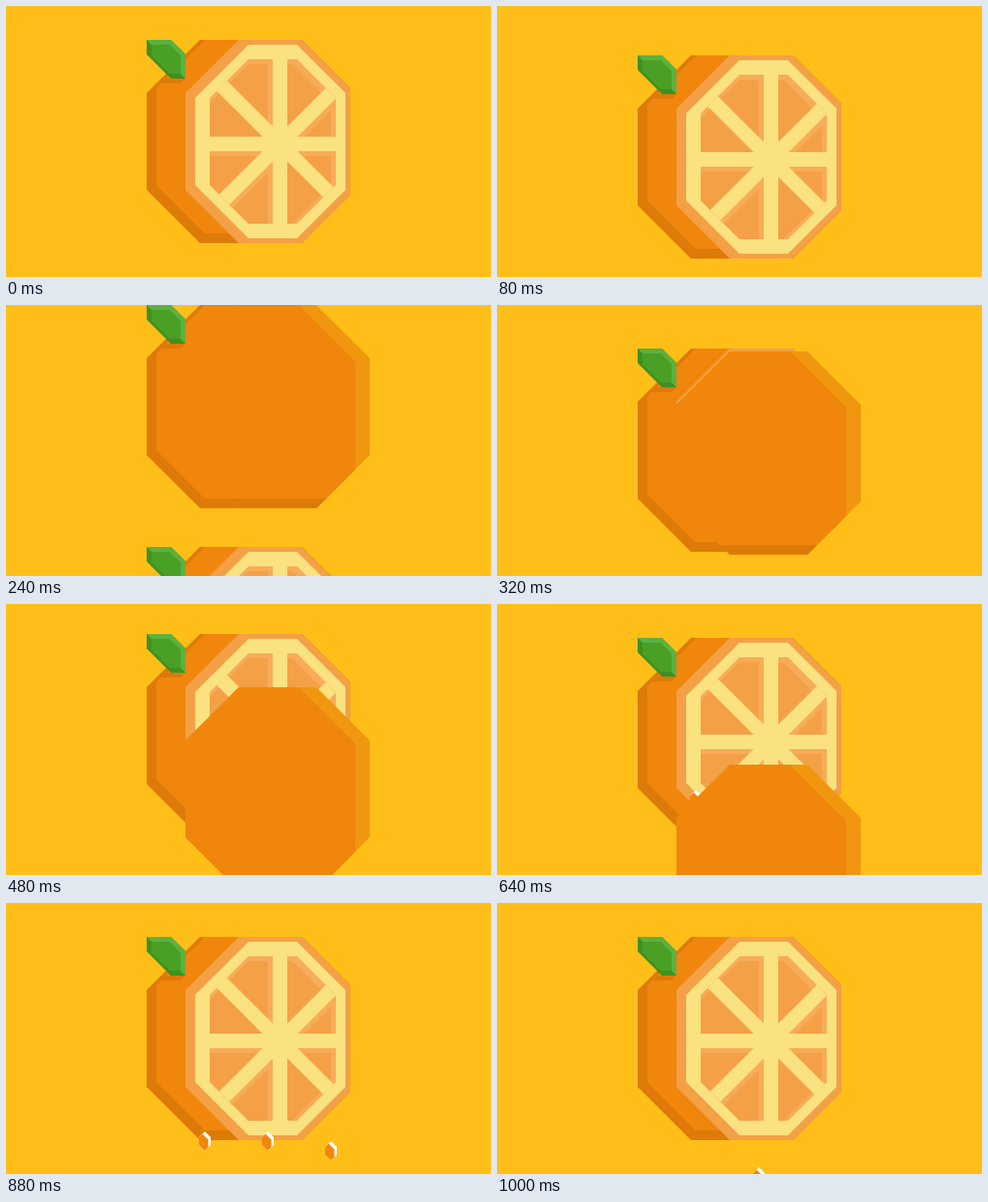
Animation of 500 by 280 pixels, one loop 1040 ms. Source, as an HTML page with a canvas:

```html
<!DOCTYPE html>
<html lang="en">
<head>
<meta charset="utf-8">
<title>Sliced orange</title>
<style>
  html, body { margin: 0; width: 100%; height: 100%; overflow: hidden; background: #ffbe18; }
  canvas { display: block; width: 500px; height: 280px; }
</style>
</head>
<body>
<canvas id="stage" width="500" height="280"></canvas>
<script>
const ctx = document.getElementById('stage').getContext('2d');
const LOOP = 1040, STEP = 40, REST = 35;
const C = {
  bg: '#ffbe18', skin: '#f0860c', dark: '#de7a08', light: '#f0970f',
  flesh: '#f4a046', lit: '#f8ac58', pith: '#f9e27f',
  leaf: '#4a9f25', leafDark: '#3f9020', leafLight: '#5cb140'
};

function poly(color, points) {
  ctx.beginPath();
  for (const [x, y] of points) ctx.lineTo(x, y);
  ctx.closePath();
  ctx.fillStyle = color;
  ctx.fill();
}

// Box with cut corners: `left` and `right` are the cut sizes on each side
function oct(color, x, y, w, h, left, right = left) {
  const r = x + w, b = y + h;
  poly(color, [
    [x + left, y], [r - right, y], [r, y + right], [r, b - right],
    [r - right, b], [x + left, b], [x, b - left], [x, y + left]
  ]);
}

// Fills a shape, then keeps further drawing inside it
function inside(shape, draw) {
  ctx.save();
  shape();
  ctx.clip();
  draw();
  ctx.restore();
}

function at(x, y, draw) {
  ctx.save();
  ctx.translate(Math.round(x), Math.round(y));
  draw();
  ctx.restore();
}

// Bar through the middle of the slice, in eighths of a turn
function spoke(color, eighth, shift = 0) {
  ctx.save();
  ctx.translate(282.5, 107.5);
  ctx.rotate(eighth * Math.PI / 4);
  ctx.fillStyle = color;
  ctx.fillRect(-120, shift - 7.5, 240, 15);
  ctx.restore();
}

function flesh() {
  oct(C.flesh, 210, 25, 125, 165, 40);
  for (const k of [-1, 0, 2]) spoke(C.lit, k, 5);
  for (let k = 0; k < 4; k++) spoke(C.pith, k);
}

function leaf(color, inset) {
  const s = 40 - 2 * inset, a = s * 0.375, lo = inset, hi = inset + s;
  poly(color, [[lo, lo], [hi - a, lo], [hi, lo + a], [hi, hi], [hi - a, hi], [lo, lo + a]]);
}

// Parts below are drawn relative to the top of the fruit
function half() {
  oct(C.dark, 145, 0, 210, 210, 55, 50);
  oct(C.skin, 155, 0, 200, 200, 50);
  poly(C.dark, [[165, 40], [185, 40], [180, 45], [160, 45]]);
  oct(C.flesh, 185, 0, 170, 210, 55, 50);
  oct(C.pith, 195, 5, 155, 200, 55, 50);
  inside(() => oct(C.lit, 210, 20, 130, 170, 40), flesh);
  at(145, 0, () => {
    inside(() => leaf(C.leafDark, 0), () => poly(C.leafLight, [[0, 0], [40, 0], [40, 40]]));
    leaf(C.leaf, 5);
  });
}

function cover() {
  inside(() => oct(C.light, 185, 0, 190, 210, 55), () => {
    oct(C.skin, 185, 0, 175, 400, 0, 58);
    ctx.fillStyle = C.dark;
    ctx.fillRect(185, 200, 190, 10);
  });
}

function drop() {
  const body = (color, x, y) => oct(color, x - 6, y, 12, 20, 6);
  inside(() => body('#fff', 0, 0), () => body(C.skin, -2.5, 2.5));
}

// Offset from rest: a braking fall, then a dying swing at the same speed
function arrive(t) {
  const hit = 290, end = 640, swing = Math.PI / 120, size = 17.8;
  const u = t - hit;
  if (u < 0) return size * swing * u - 0.0047 * u * u;
  return t < end ? size * Math.exp(-0.00766 * u) * Math.sin(swing * u) : 0;
}

const leave = t => t < 80 ? 0 : 95 * ((t - 40) / 120) ** 1.6;

// The cut slice speeds up, then slides at a steady pace
function slide(t) {
  const from = 272, to = 458, speed = 0.478;
  if (t < from) return 0;
  if (t < to) return speed * (t - from) ** 2 / (2 * (to - from));
  return speed * (t - (from + to) / 2);
}

const drops = [
  { x: 205, y: 192, start: 600 },
  { x: 335, y: 225.5, start: 680 },
  { x: 270, y: 218, start: 690 }
];

function draw(t) {
  ctx.fillStyle = C.bg;
  ctx.fillRect(0, 0, 500, 280);
  at(0, REST + leave(t), half);
  if (t < 80) return;
  const top = REST + arrive(t);
  at(0, top, half);
  for (const d of drops) {
    if (t >= d.start) at(d.x, d.y + 2.45 * ((t - d.start) / 80) ** 2.3, drop);
  }
  at(0, top + slide(t), cover);
}

function tick() {
  const t = performance.now() % LOOP;
  draw(Math.floor(t / STEP) * STEP);
  requestAnimationFrame(tick);
}
tick();
</script>
</body>
</html>
```
